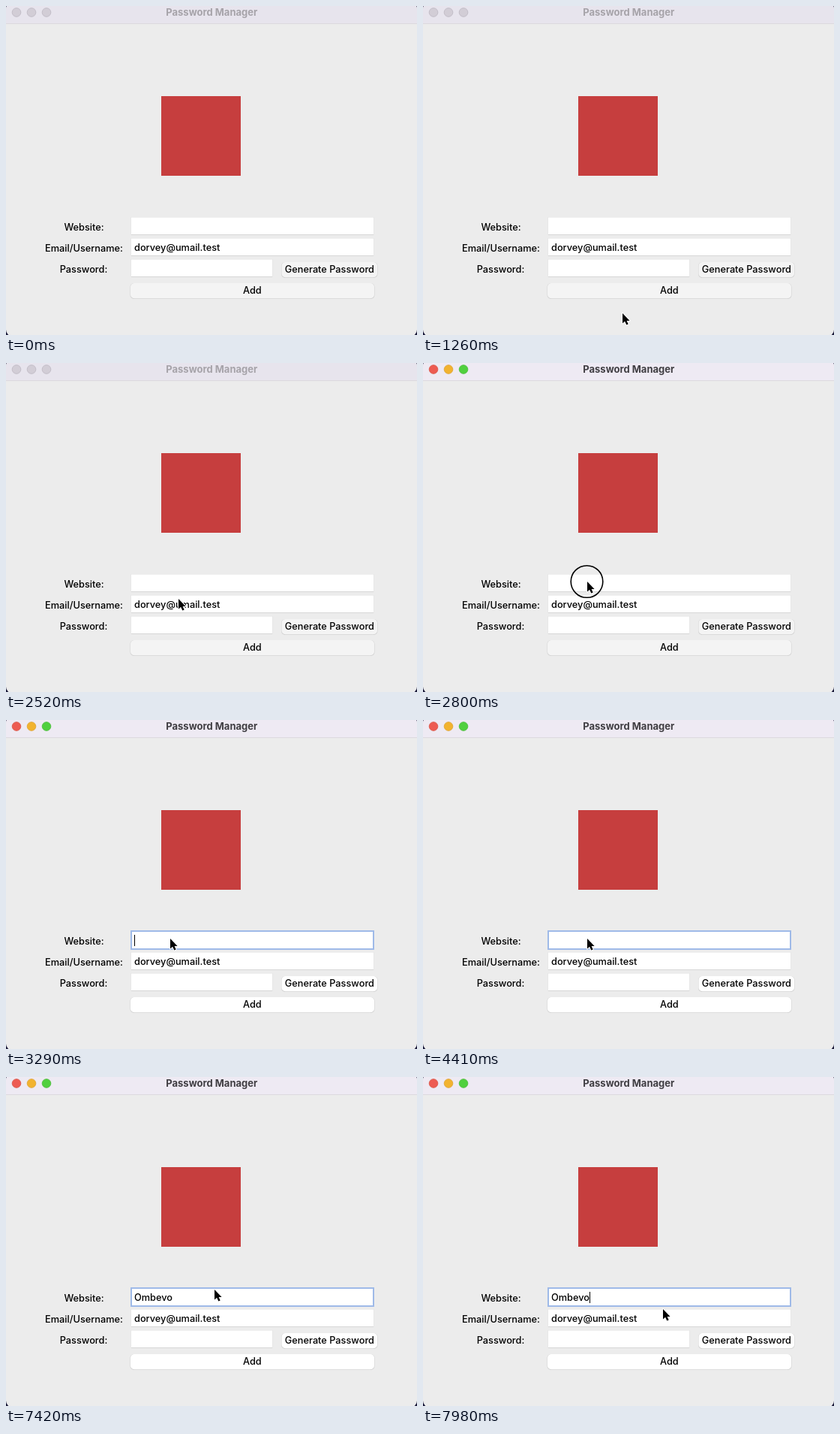
Animation, 548 px wide and 438 px high, one loop 8000 ms. Source, as an HTML page:

```html
<!DOCTYPE html>
<html lang="en">
<head>
<meta charset="utf-8">
<title>Password Manager</title>
<style>
  html, body { margin: 0; width: 100%; height: 100%; overflow: hidden; background: #1b1a3a; }
  svg { display: block; width: 548px; height: 438px; }
  text { font: 450 12.75px Inter, "Noto Sans", sans-serif; fill: #000; }
  .mid { text-anchor: middle; }
  #title { font-size: 13px; font-weight: 700; }
  .edge { fill: #e2e2e2; }
  .line { fill: #c6c6c6; }
  .field { fill: #fff; }
  .shade { fill: #d2d2d2; }
</style>
</head>
<body>
<svg viewBox="0 0 548 438">
  <defs>
    <clipPath id="frame"><rect y="-5" width="548" height="445" rx="9"/></clipPath>
  </defs>
  <g clip-path="url(#frame)">
    <rect width="548" height="438" fill="#ececec"/>
    <rect id="bar" width="548" height="23"/>
    <rect y="23" width="548" height="1" fill="#dcd9de"/>
  </g>
  <g id="lights" stroke-width=".8"></g>
  <text id="title" class="mid" x="274.3" y="13">Password Manager</text>

  <rect x="207" y="120" width="106" height="106" fill="#c63e3e"/>

  <text class="mid" x="104" y="299">Website:</text>
  <text class="mid" x="104" y="327">Email/Username:</text>
  <text class="mid" x="103.5" y="355">Password:</text>
  <g id="fields"></g>
  <rect id="ring" x="167" y="281" width="323" height="24" fill="none" stroke="#9fbae8" stroke-width="2"/>
  <text id="site" x="171" y="298"></text>
  <text x="171" y="326">dorvey@umail.test</text>
  <rect id="caret" y="286" width="1" height="15"/>
  <g id="buttons"></g>
  <text class="mid" x="431.4" y="355">Generate Password</text>
  <text class="mid" x="328.3" y="383">Add</text>

  <circle id="press" cx="218.5" cy="291" r="21.3" fill="none" stroke="#000" stroke-width="1.6"/>
  <path id="cursor" d="M0 0V13.6L3.1 10.8L5.3 15.6L7.7 14.5L5.6 9.9H9.6Z"
        stroke="#fff" stroke-width="2" stroke-linejoin="round" paint-order="stroke"/>
</svg>
<script>
const LOOP = 8000, STEP = 70;
const WORD = "Ombevo";
const KEY_TIMES = [4620, 5110, 5530, 5880, 6160, 6440];
const CARET_TOGGLES = [2870, 3500, 3780, 4410, 4760, 5390, 5670, 6300, 6650, 7280, 7560];
const ACTIVE_AT = 2730, FOCUS_AT = 2870;
// time, x, y of the pointer tip
const POINTER = [
  [1260, 266, 409], [1330, 263, 399], [1400, 260, 388], [1470, 258.5, 383.5],
  [2170, 258.5, 383.5], [2310, 254, 370], [2450, 237, 329], [2590, 223, 299], [2730, 219, 291],
  [7140, 219, 291], [7210, 228, 289], [7350, 266, 284], [7420, 278, 283],
  [7630, 293, 288], [7840, 313, 302], [7980, 320, 309]
];

const $ = id => document.getElementById(id);
const rect = (x, y, w, h, cls, rx = 0) =>
  `<rect x="${x}" y="${y}" width="${w}" height="${h}" rx="${rx}" class="${cls}"/>`;
const field = (y, w) =>
  rect(166.5, y, w + 1, 24, "edge") + rect(167, y + 23, w, 1, "line") +
  rect(167, y + .5, w, 22.8, "field");
const button = (x, y, w) =>
  rect(x, y, w, 21, "shade", 5) + rect(x + .5, y, w - 1, 20.2, "face", 5);

$("fields").innerHTML = field(281, 323) + field(309, 323) + field(337, 188);
$("buttons").innerHTML = button(367, 341, 128.5) + button(165.5, 369, 326);
$("lights").innerHTML = [14, 34, 54].map(x => `<circle cx="${x}" cy="8.5" r="5.8"/>`).join("");

const LIGHTS = [["#ed5b52", "#d8503f"], ["#f2b32f", "#dca02b"], ["#50d03e", "#45b934"]];
const DIM_LIGHT = ["#d2cdd6", "#bcb6c0"];
const passed = (times, t) => times.filter(at => at <= t).length;
const show = (id, on) => $(id).setAttribute("visibility", on ? "visible" : "hidden");
const paint = (el, fill) => { el.style.fill = fill; };

function pointerAt(t) {
  const i = POINTER.findIndex(p => p[0] > t);
  if (i < 0) return POINTER.at(-1).slice(1);
  const [t0, x0, y0] = POINTER[i - 1], [t1, x1, y1] = POINTER[i];
  const k = (t - t0) / (t1 - t0);
  return [x0 + (x1 - x0) * k, y0 + (y1 - y0) * k];
}

function render(time) {
  const t = Math.floor(time / STEP) * STEP;
  const active = t >= ACTIVE_AT, focused = t >= FOCUS_AT;

  paint($("bar"), active ? "#eeeaf3" : "#e7e4ed");
  paint($("title"), active ? "#403e43" : "#a6a3a9");
  [...$("lights").children].forEach((light, i) => {
    const [fill, stroke] = active ? LIGHTS[i] : DIM_LIGHT;
    paint(light, fill);
    light.setAttribute("stroke", stroke);
  });
  document.querySelectorAll(".face").forEach(el => paint(el, focused ? "#fff" : "#f4f4f4"));
  show("ring", focused);

  $("site").textContent = WORD.slice(0, passed(KEY_TIMES, t));
  $("caret").setAttribute("x", Math.round(170.5 + $("site").getComputedTextLength()));
  show("caret", passed(CARET_TOGGLES, t) % 2);

  show("press", active && t < 3080);
  $("press").setAttribute("opacity", t < 3010 ? 1 : .5);

  const visible = t >= POINTER[0][0];
  show("cursor", visible);
  if (visible) $("cursor").setAttribute("transform", `translate(${pointerAt(t)})`);
}

const start = performance.now();
function tick() {
  render((performance.now() - start) % LOOP);
  requestAnimationFrame(tick);
}
tick();
</script>
</body>
</html>
```
